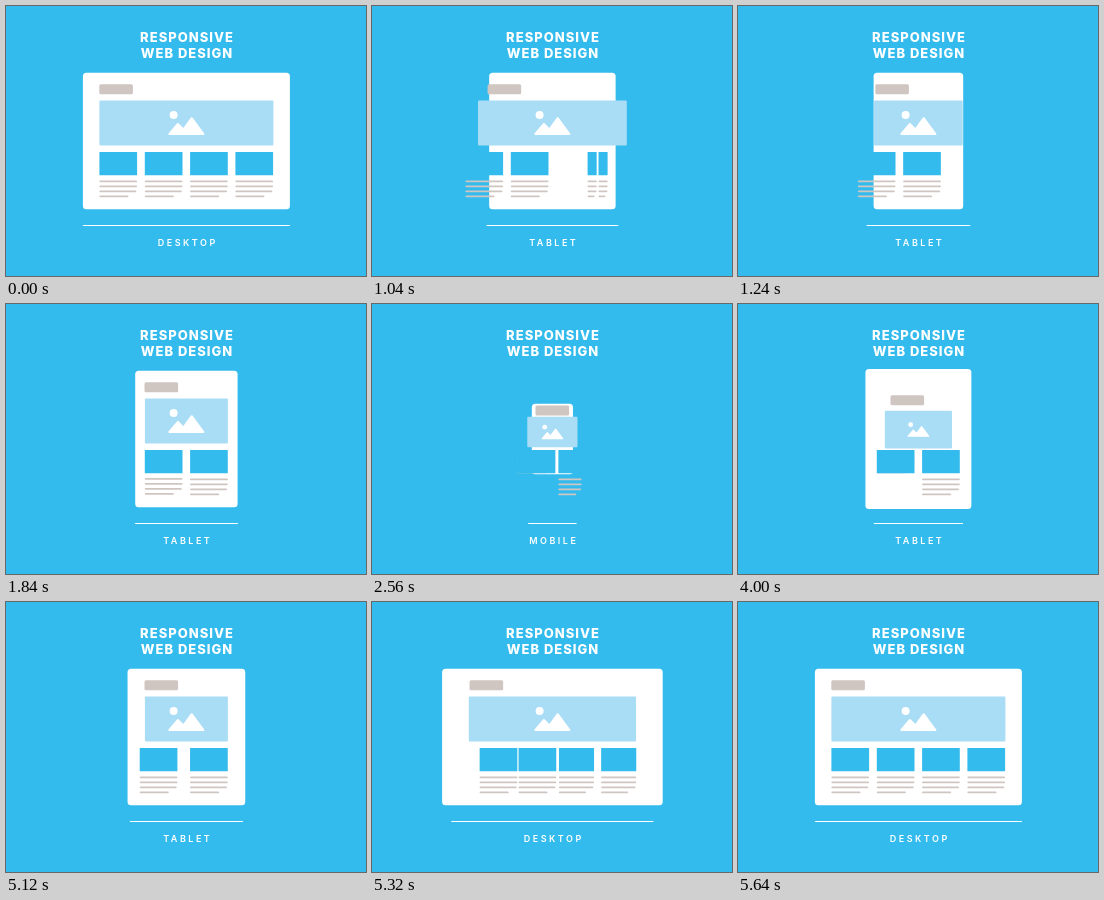
Recreate the animation shown at these times as an HTML page with a canvas. Size 360 by 270 pixels, loop 5720 ms.

```html
<!DOCTYPE html>
<html lang="en">
<head>
<meta charset="utf-8">
<title>Responsive web design</title>
<style>
  html, body { margin: 0; width: 100%; height: 100%; overflow: hidden; background: #33bbed; }
  canvas { display: block; width: 360px; height: 270px; }
</style>
</head>
<body>
<canvas id="stage" width="360" height="270"></canvas>
<script>
const ctx = document.getElementById('stage').getContext('2d');
const LOOP = 5720;
const BLUE = '#33bbed', PALE = '#a9dcf5', GREY = '#cfc5c1', WHITE = '#fff';
const CENTER = 180.4;

const easeIn = p => p ** 3;
const easeOut = p => 1 - (1 - p) ** 3;
const easeQuart = p => 1 - (1 - p) ** 4;
const easeInOut = p => p < .5 ? 4 * p ** 3 : 1 - 4 * (1 - p) ** 3;
const easeBack = p => 1 + 3 * (p - 1) ** 3 + 2 * (p - 1) ** 2;

function progress(t, [start, end, ease = easeOut]) {
  return ease(Math.min(1, Math.max(0, (t - start) / (end - start))));
}

// Follows desktop > tablet > mobile > tablet > desktop, one timing per step.
function follow(t, timing, desktop, tablet, mobile) {
  const stops = [desktop, tablet, mobile, tablet, desktop];
  return timing.reduce(
    (value, step, i) => value + (stops[i + 1] - stops[i]) * progress(t, step), desktop);
}

const TIMING = {
  body: [[940, 1420, easeBack], [2320, 2800, easeBack], [3720, 4080, easeBack], [5110, 5470, easeBack]],
  rule: [[920, 1360, easeQuart], [2310, 2750, easeQuart], [3900, 4240, easeQuart], [5110, 5440]],
  logo: [[960, 1360], [2280, 2540], [3950, 4240], [5130, 5480]],
  hero: [[1000, 1400], [2420, 2820], [3910, 4220], [5130, 5460]],
  heroY: [[1000, 1400], [2280, 2540], [3980, 4240], [5130, 5460]],
  icon: [[1000, 1400], [2280, 2540], [4000, 4240], [5130, 5460]],
  first: [[1040, 1420, easeInOut], [2520, 2880], [3720, 3980], [4880, 5380, easeIn]],
  second: [[1040, 1420, easeInOut], [2505, 2880], [3720, 3980], [5100, 5440, easeInOut]],
  extra: [[890, 1290], [2280, 2840], [3720, 4240], [5120, 5460]]
};

function box(x, y, w, h, color, radius = 0) {
  if (w <= 0 || h <= 0) return;
  ctx.fillStyle = color;
  ctx.beginPath();
  ctx.roundRect(x, y, w, h, Math.min(radius, w / 2, h / 2));
  ctx.fill();
}

function label(text, baseline, font, spacing) {
  ctx.font = font;
  ctx.letterSpacing = spacing + 'px';
  ctx.textAlign = 'center';
  ctx.fillStyle = WHITE;
  ctx.fillText(text, 180.5 + spacing / 2, baseline);
}

function column(x, width, lineOffset = () => 0) {
  [1, 1, .98, .77].forEach((part, i) =>
    box(x, 174.4 + 5 * i + lineOffset(i), width * part, 1.8, GREY, .8));
  box(x, 146, width, 23.3, BLUE, .6);
}

function picture(x, y, scale) {
  ctx.save();
  ctx.translate(x, y);
  ctx.scale(scale, scale);
  ctx.fillStyle = ctx.strokeStyle = WHITE;
  ctx.lineJoin = 'round';
  ctx.lineWidth = 2;
  ctx.beginPath();
  ctx.arc(-12.8, -8, 4, 0, 7);
  ctx.fill();
  ctx.beginPath();
  [[-17, 11], [-8.5, 1], [-3, 6.5], [5.3, -4.8], [17, 11]].forEach(p => ctx.lineTo(...p));
  ctx.closePath();
  ctx.fill();
  ctx.stroke();
  ctx.restore();
}

function deviceName(t) {
  if (t < 920 || t >= 5140) return 'DESKTOP';
  return t >= 2320 && t < 3760 ? 'MOBILE' : 'TABLET';
}

function draw(t) {
  const at = (part, ...values) => follow(t, TIMING[part], ...values);
  box(0, 0, 360, 270, BLUE);

  label('RESPONSIVE', 36, '800 13px Inter, sans-serif', 1);
  label('WEB DESIGN', 51.5, '800 13px Inter, sans-serif', 1);
  label(deviceName(t), 240.2, '600 9px Inter, sans-serif', 2.5);

  const rule = at('rule', 207, 103, 46.5);
  box(CENTER - rule / 2, 219, rule, 1, WHITE);

  const width = at('body', 207, 102.4, 48);
  const height = at('body', 136.4, 136.4, 78);
  box(CENTER - width / 2, 135 - height / 2, width, height, WHITE, 3.5);

  box(at('logo', 93.3, 138.5, 163.5), at('logo', 78.2, 78.2, 101.5), 33.6, 10, GREY, 1.5);

  const heroWidth = at('hero', 174, 83, 38);
  const heroHeight = at('hero', 44.8, 44.8, 25);
  const heroY = at('heroY', 117, 117, 128);
  box(CENTER - heroWidth / 2, heroY - heroHeight / 2, heroWidth, heroHeight, PALE, 1);
  picture(CENTER, heroY, at('icon', 1, 1, .6));

  const squeeze = at('extra', 1, 0, 0);
  if (squeeze > .01) {
    for (const x of [-41.5, 3.8]) column(225.6 + x * squeeze, 37.7 * squeeze);
  }
  const secondWidth = at('second', 37.7, 37.7, 0);
  if (secondWidth > .3) column(at('second', 138.8, 184.1, 190), secondWidth);

  // On small screens the first column tucks its lines behind the card.
  const tuck = i => {
    const back = i === 3 ? [4080, 4300] : [4290, 4690];
    return 22 * (progress(t, back) - progress(t, [1680, 2240, easeIn]));
  };
  column(at('first', 93.4, 138.8, 161.4), 37.7, tuck);
}

function tick() {
  draw(performance.now() % LOOP);
  requestAnimationFrame(tick);
}
tick();
</script>
</body>
</html>
```
